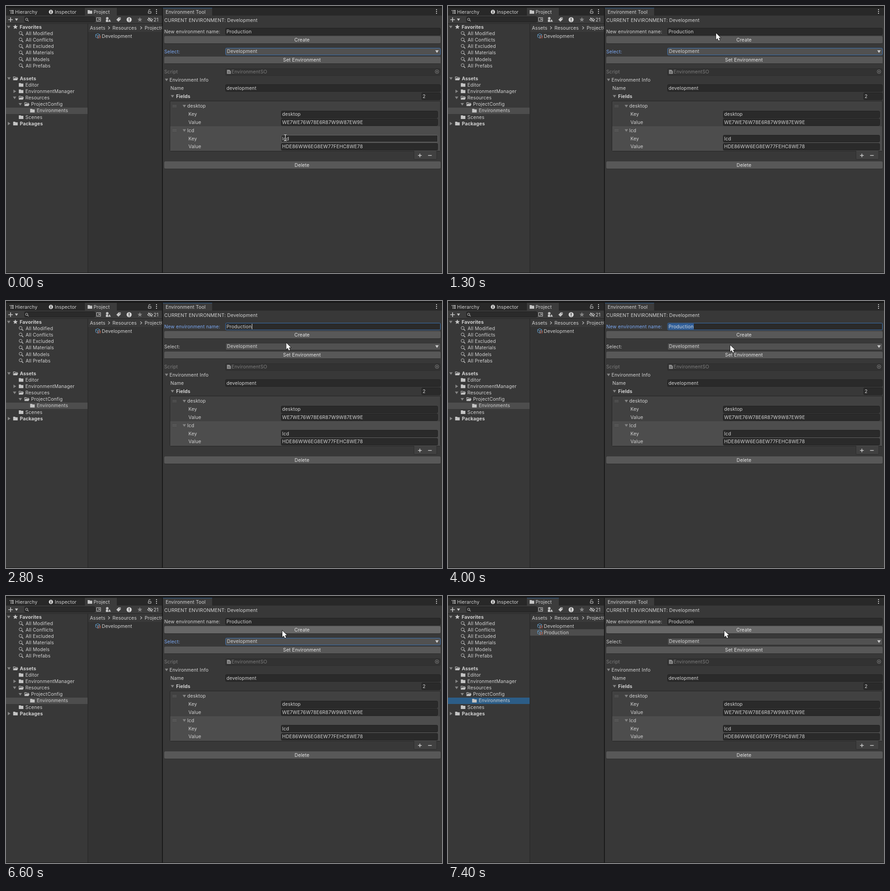
An HTML page with a canvas that plays this animation: 956 px wide and 586 px high, repeating every 8 s.

```html
<!DOCTYPE html>
<html lang="en">
<head>
<meta charset="utf-8">
<title>Environment Tool</title>
<style>
html, body { margin: 0; width: 956px; height: 586px; overflow: hidden; background: #383838; }
canvas { display: block; }
</style>
</head>
<body>
<canvas id="stage" width="956" height="586"></canvas>
<script>
const ctx = document.getElementById('stage').getContext('2d');
const LOOP = 8000, STEP = 100;
const TEXT = '#d2d2d2', DIM = '#7d7d7d', ACCENT = '#3a72b4', TAB_LINE = '#2f5f92', LINK = '#7ba8f2', ICON = '#c4c4c4';

// Pointer moves: start, end, target x, target y
const START = [612, 289];
const MOVES = [
  [0, 800, 632, 100],
  [800, 1500, 577, 51],
  [2400, 2900, 619, 98],
  [5900, 6200, 617, 117],
  [6200, 6600, 606, 77]
];

function pointer(t) {
  let [x, y] = START;
  for (const [from, to, tx, ty] of MOVES) {
    const p = Math.min(1, Math.max(0, (t - from) / (to - from)));
    const e = p * p * (3 - 2 * p);
    x += (tx - x) * e;
    y += (ty - y) * e;
  }
  return [x, y];
}

// Drawing helpers; text and icons are placed by their vertical centre.
function rect(x, y, w, h, fill) {
  ctx.fillStyle = fill;
  ctx.fillRect(x, y, w, h);
}

function box(x, y, w, h, fill, border, r = 2) {
  ctx.beginPath();
  ctx.roundRect(x + .5, y + .5, w - 1, h - 1, r);
  ctx.fillStyle = fill;
  ctx.fill();
  ctx.strokeStyle = border;
  ctx.lineWidth = 1;
  ctx.stroke();
}

function text(s, x, y, color = TEXT, weight = 400, align = 'left') {
  ctx.font = `${weight} 10.4px Inter, sans-serif`;
  ctx.letterSpacing = '0.16px';
  ctx.textAlign = align;
  ctx.fillStyle = color;
  ctx.fillText(s, x, y + 3.7);
}

function poly(points, fill) {
  ctx.beginPath();
  for (let i = 0; i < points.length; i += 2) ctx.lineTo(points[i], points[i + 1]);
  ctx.closePath();
  ctx.fillStyle = fill;
  ctx.fill();
}

function stroke(d, x, y, color = ICON, width = 1) {
  ctx.save();
  ctx.translate(x, y);
  ctx.strokeStyle = color;
  ctx.lineWidth = width;
  ctx.stroke(new Path2D(d));
  ctx.restore();
}

function dot(x, y, r, fill = ICON) {
  ctx.beginPath();
  ctx.arc(x, y, r, 0, 7);
  ctx.fillStyle = fill;
  ctx.fill();
}

function down(x, y, color = '#858585', r = 3.7) {
  poly([x - r, y - r * .7, x + r, y - r * .7, x, y + r * .8], color);
}

function right(x, y) {
  poly([x - 2.5, y - 3.7, x + 3.3, y, x - 2.5, y + 3.7], '#858585');
}

function folder(x, y, open) {
  if (open) {
    stroke('M-4.5 3.5V-3.5H-1L0 -2.3H4V-.5', x, y, ICON, 1.1);
    poly([x - 2.8, y - .8, x + 6, y - .8, x + 4, y + 4, x - 5, y + 4], ICON);
  } else {
    poly([x - 5, y - 4, x - .8, y - 4, x + .4, y - 2.8, x + 5, y - 2.8, x + 5, y + 4, x - 5, y + 4], ICON);
  }
}

function star(x, y, r, color = ICON) {
  const points = [];
  for (let i = 0; i < 10; i++) {
    const a = i * Math.PI / 5 - Math.PI / 2, d = i % 2 ? r * .45 : r;
    points.push(x + d * Math.cos(a), y + d * Math.sin(a));
  }
  poly(points, color);
}

function lens(x, y, size = 1) {
  const r = 3.3 * size;
  ctx.beginPath();
  ctx.arc(x - size, y - size, r, 0, 7);
  ctx.strokeStyle = ICON;
  ctx.lineWidth = 1;
  ctx.stroke();
  stroke(`M${1.4 * size} ${1.4 * size}L${4.8 * size} ${4.8 * size}`, x, y, ICON, 1.5 * size);
}

function kebab(x, y) {
  for (const d of [-4, 0, 4]) rect(x - 1, y + d - 1, 2, 2, TEXT);
}

function info(x, y, r) {
  dot(x, y, r, TEXT);
  rect(x - .8, y - r * .6, 1.6, r * .35, '#282828');
  rect(x - .8, y - r * .1, 1.6, r * .75, '#282828');
}

function field(x, y, end, value, border = '#212121') {
  box(x, Math.round(y - 8), end - x, 16, '#2a2a2a', border);
  text(value, x + 2.5, y);
}

function button(label, y, state) {
  const fill = { hover: '#676767', down: '#46607c' }[state] || '#585858';
  box(347, Math.round(y - 8), 606, 16, fill, fill);
  rect(348, Math.round(y + 7.5), 604, 1, '#2b2b2b');
  text(label, 649, y, '#e6e6e6', 400, 'center');
}

function asset(name, y) {
  stroke('M0 -5L4.5 -2.6V2.6L0 5L-4.5 2.6V-2.6ZM-4.5 -2.6L0 0L4.5 -2.6M0 0V5', 201, y - .5, '#5f9cc9');
  stroke('M-1 -3Q-2 -3 -2 -1.5T-3 0Q-2 0 -2 1.5T-1 3M1 -3Q2 -3 2 -1.5T3 0Q2 0 2 1.5T1 3', 204.5, y + 2, '#e0623c', 1.1);
  text(name, 210, y);
}

// Left window: tabs, toolbar, folder tree and file list
function project(created) {
  rect(0, 4, 342, 17, '#282828');
  rect(173, 4, 70, 18, '#3c3c3c');
  if (created) rect(173, 4, 70, 1, TAB_LINE);
  stroke('M-4 -3H-2M-1 -3H5M-2 0H0M1 0H5M-2 3H0M1 3H5', 12, 13, TEXT, 1.3);
  text('Hierarchy', 20, 13);
  info(98.5, 13, 4.7);
  text('Inspector', 107, 13);
  folder(184, 13);
  text('Project', 192, 13);
  box(311.5, 11.5, 7, 5, '#282828', TEXT, 0);
  stroke('M-2 0V-2.2Q0 -5 2 -2.2', 315, 11, TEXT);
  kebab(330, 12);

  rect(0, 21, 342, 17, '#3c3c3c');
  rect(0, 38, 342, 1, '#232323');
  stroke('M-5 0H5M0 -5V5', 10, 30, ICON, 1.7);
  down(23, 30, ICON, 3.5);
  box(40, 23, 156, 13, '#2a2a2a', '#212121', 3);
  lens(46, 30, .75);
  box(198, 25, 10, 9, '#3c3c3c', ICON, 0);
  stroke('M-1 3L3 -1M0 -1.5H3.5V2', 202, 29.5, ICON);
  dot(222, 27, 2.8);
  rect(219, 30, 5, 5, ICON);
  poly([224, 34.5, 227, 29, 230, 34.5], ICON);
  poly([242, 30, 247, 25, 251.5, 25, 251.5, 29.5, 246.5, 34.5], ICON);
  dot(249.5, 27, .9, '#3c3c3c');
  dot(270, 30, 5.6, TEXT);
  rect(269.2, 26.5, 1.7, 4.5, '#3c3c3c');
  rect(269.2, 32, 1.7, 1.6, '#3c3c3c');
  star(293.5, 30, 5.5, '#858585');
  stroke('M-5.5 0Q0 -6.5 5.5 0Q0 6.5 -5.5 0ZM-4 -4.5L4.5 4.5', 316, 30, ICON, 1.2);
  dot(316, 30, 1.6);
  text('21', 323.5, 30);

  down(6, 46);
  star(20.5, 46, 5.6);
  text('Favorites', 30, 46, TEXT, 700);
  ['Modified', 'Conflicts', 'Excluded', 'Materials', 'Models', 'Prefabs'].forEach((name, i) => {
    const y = 60.2 + i * 14.15;
    lens(33, y);
    text('All ' + name, 43, y);
  });

  rect(0, 223, 179, 14, created ? '#2c5d87' : '#4d4d4d');
  // name, depth, arrow, bold
  const tree = [
    ['Assets', 0, 'down', 1], ['Editor', 1], ['EnvironmentManager', 1, 'right'],
    ['Resources', 1, 'down'], ['ProjectConfig', 2, 'down'], ['Environments', 3],
    ['Scenes', 1], ['Packages', 0, 'right', 1]
  ];
  tree.forEach(([name, depth, arrow, bold], i) => {
    const y = 159 + i * 14.15, x = depth * 12.4;
    if (arrow === 'down') down(x + 6.5, y);
    if (arrow === 'right') right(x + 6.5, y);
    folder(x + 20.7, y, arrow === 'down');
    text(name, x + 30.2, y, TEXT, bold ? 700 : 400);
  });

  rect(179, 39, 1, 546, '#232323');
  rect(180, 39, 162, 546, '#333');
  rect(180, 39, 162, 18, '#393939');
  text('Assets', 184, 48);
  text('Resources', 233.5, 48);
  text('ProjectConfig', 304, 48);
  for (const x of [226, 296.5]) stroke('M-2 -3L1.5 0L-2 3', x, 48, ICON, 1.1);
  asset('Development', 66);
  if (created) {
    rect(180, 73, 162, 14, '#4d4d4d');
    asset('Production', 80);
  }
}

function entry(name, code, y, hovered) {
  for (const d of [-1.5, 1.5]) rect(365, y + d - .5, 9, 1, '#636363');
  down(391, y);
  text(name, 397.5, y);
  text('Key', 400, y + 18);
  field(603, y + 18, 947, name, hovered ? '#656565' : undefined);
  text('Value', 400, y + 35.7);
  field(603, y + 35.7, 947, code);
}

// Right window: the tool itself
function tool(t, created) {
  const naming = t >= 2100 && t < 5700;
  const selecting = t < 2100 || (t >= 5700 && t < 7100);
  const [, y] = pointer(t);

  rect(342, 4, 2, 582, '#191919');
  rect(344, 4, 612, 582, '#383838');
  rect(344, 4, 612, 17, '#282828');
  rect(344, 4, 108, 17, '#3c3c3c');
  if (!created) rect(344, 4, 108, 1, TAB_LINE);
  text('Environment Tool', 350, 13);
  kebab(944, 12);
  text('CURRENT ENVIRONMENT: Development', 347, 31);

  text('New environment name:', 347, 56, naming ? LINK : TEXT);
  field(481, 56, 953, '', naming ? ACCENT : undefined);
  if (naming && t >= 4000) rect(483, 49.5, 56, 13, '#305f9b');
  text('Production', 483.5, 56);
  if (naming && t < 4000) rect(539, 50, 1, 12, '#e0e0e0');
  button('Create', 74, t >= 7100 && t < 7200 ? 'down' : t > 6000 && y > 66 && y < 82 ? 'hover' : '');

  text('Select:', 347, 100, selecting ? LINK : TEXT);
  box(481, 92, 472, 16, '#515151', selecting ? ACCENT : '#303030');
  text('Development', 484.5, 99.5);
  down(945, 100, '#d0d0d0', 3.8);
  button('Set Environment', 118.7, t > 5900 && y > 110 && y < 127 ? 'hover' : '');

  text('Script', 347, 144.5, DIM);
  box(481, 137, 472, 16, '#323232', '#2d2d2d');
  poly([484.5, 140, 490, 140, 493, 143, 493, 149, 484.5, 149], '#909090');
  stroke('M-2 -1H2M-2 1.5H2', 488.7, 145, '#444');
  text('EnvironmentSO', 494.5, 144.5, DIM);
  stroke('M-4 0A4 4 0 1 0 4 0A4 4 0 1 0 -4 0', 945, 144, DIM);
  dot(945, 144, 1.5, DIM);

  down(352, 162);
  text('Environment Info', 358.5, 162);
  text('Name', 360.5, 180);
  field(481, 180, 953, 'development');
  down(365, 198);
  text('Fields', 373, 198, TEXT, 700);
  field(911, 198, 953, '2');

  box(359, 208, 594, 111, '#414141', '#242424');
  rect(360, 264, 592, 54, '#4d4d4d');
  entry('desktop', 'WE7WE76W78E6R87W9W87EW9E', 219.7);
  entry('lcd', 'HDE86WW6EG8EW77FEHC8WE78', 273, t < 100);
  box(894, 318, 51, 19, '#414141', '#2c2c2c');
  rect(895, 318, 49, 1, '#414141');
  stroke('M-4 0H4M0 -4V4', 907.5, 328, TEXT, 1.4);
  stroke('M-4 0H4', 929.5, 328, TEXT, 1.4);
  button('Delete', 349, '');
}

function cursor(t) {
  const [x, y] = pointer(t);
  if (t < 200) {
    const beam = 'M-3 -7Q0 -7 0 -5V5Q0 7 -3 7M3 -7Q0 -7 0 -5M0 5Q0 7 3 7';
    stroke(beam, x + .5, y, '#222', 2.6);
    stroke(beam, x + .5, y, '#eee', 1.2);
    return;
  }
  const arrow = 'M0 -1V13L3.2 10L5.5 15.3L8 14.2L5.7 9H10Z';
  stroke(arrow, x, y, '#111', 1.4);
  ctx.save();
  ctx.translate(x, y);
  ctx.fillStyle = '#fff';
  ctx.fill(new Path2D(arrow));
  ctx.restore();
}

function draw(t) {
  const created = t >= 7200;
  rect(0, 0, 956, 586, '#383838');
  rect(0, 0, 956, 4, '#191919');
  project(created);
  tool(t, created);
  rect(0, 585, 956, 1, '#191919');
  cursor(t);
}

const begin = performance.now();
function frame() {
  const t = (performance.now() - begin) % LOOP;
  draw(Math.floor(t / STEP) * STEP);
  requestAnimationFrame(frame);
}
frame();
</script>
</body>
</html>
```
